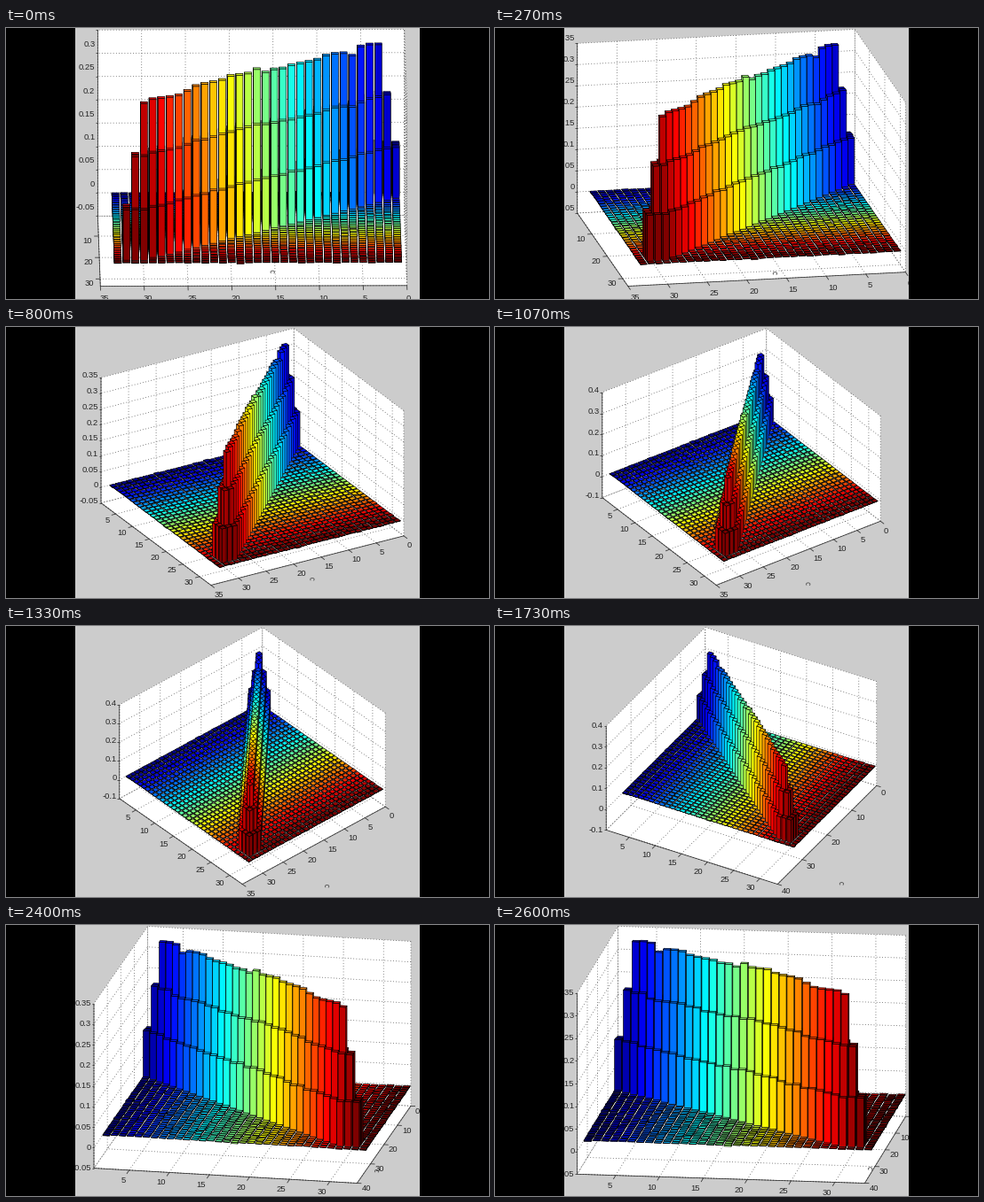
A matplotlib script that plays this animation: 544 by 306 pixels, repeating every 2.67 s.

```python
import numpy as np
import matplotlib.pyplot as plt
from matplotlib.animation import FuncAnimation
from matplotlib.collections import LineCollection, PolyCollection
from matplotlib.patches import Rectangle

W, H, DPI = 544, 306, 100
LOOP, SLOT, STEPS = 2670, 30, 40    # ms, ms, view changes per loop
PX = 72 / DPI                       # points per pixel

N, HALF = 33, 0.4                   # bars per side, half a bar's width
X0, X1 = 1 - HALF, N + HALF
DEPTH, TALL = 0.975, 0.626          # box proportions relative to its width
MID_X, TOP, SPAN = 277, 1, 290      # the projected box always fills this height

# The drag of the view: step, turn and elevation in degrees
KEYS = np.array([0, 7, 12, 20, 26, 32, 39])
TURN = np.array([0.5, 18.1, 30.3, 41.4, 60.6, 73.4, 82.1])
ELEV = np.array([13.6, 18.2, 26.0, 38.0, 34.2, 22.1, 13.1])

# Height of the ridge along the diagonal, in thousandths
CREST = [331, 333, 336, 320, 328, 333, 334, 329, 330, 330, 331, 330, 331, 330,
         340, 339, 338, 341, 338, 335, 337, 336, 331, 328, 329, 332, 331, 328]


def glide(step, values):
    """Smooth cubic through the key values."""
    slopes = np.gradient(values, KEYS)
    i = min(np.searchsorted(KEYS, step, "right") - 1, len(KEYS) - 2)
    span = KEYS[i + 1] - KEYS[i]
    t = (step - KEYS[i]) / span
    return ((2 * t**3 - 3 * t**2 + 1) * values[i]
            + (t**3 - 2 * t**2 + t) * span * slopes[i]
            + (3 * t**2 - 2 * t**3) * values[i + 1]
            + (t**3 - t**2) * span * slopes[i + 1])


def rainbow(t):
    """Dark blue through cyan and yellow to dark red."""
    centers = np.array([3, 2, 1])
    return np.clip(1.5 - np.abs(4 * np.asarray(t)[:, None] - centers), 0, 1)


def bar_heights():
    """Overlap of three-wide windows sliding down the diagonal."""
    i, j = np.mgrid[1:N + 1, 1:N + 1]
    low, high = np.minimum(i, j), np.maximum(i, j)
    count = np.maximum(0, np.minimum(30, low) - np.maximum(1, high - 2) + 1)
    crest = np.pad(np.array(CREST) / 1000, (2, 3), mode="edge")
    noise = np.random.default_rng(4).normal(0, 0.0013, (N, N))
    return count / 3 * (crest[:, None] + crest) / 2 + noise


def bar_faces():
    """Top and the two near sides of each bar, ordered from far to near."""
    z = bar_heights()
    i, j = np.mgrid[1:N + 1, 1:N + 1]
    xa, xb, ya, yb = i - HALF, i + HALF, j - HALF, j + HALF
    lo, hi = np.minimum(z, 0), np.maximum(z, 0)
    faces = [
        [(xb, ya, lo), (xb, yb, lo), (xb, yb, hi), (xb, ya, hi)],
        [(xa, yb, lo), (xb, yb, lo), (xb, yb, hi), (xa, yb, hi)],
        [(xa, ya, hi), (xb, ya, hi), (xb, yb, hi), (xa, yb, hi)],
    ]
    return np.moveaxis(np.array(faces), (3, 4), (0, 1)).reshape(-1, 4, 3)


class View:
    """Orthographic box with its axis limits and tick steps."""

    def __init__(self, step):
        turn = np.radians(glide(step, TURN))
        elev = np.radians(glide(step, ELEV))
        c, s, k = np.cos(turn), np.sin(turn), np.sin(elev)
        size = SPAN / (TALL * np.cos(elev) + k * (DEPTH * c + s))
        self.x = size * DEPTH * np.array([s, c * k])
        self.y = size * np.array([-c, s * k])
        self.rise = size * TALL * np.cos(elev)
        left = MID_X - (self.x[0] - self.y[0]) / 2
        self.origin = np.array([left - self.y[0], TOP + self.rise])
        self.cursor = (299 + 1.5 * np.degrees(turn), 265 + 0.75 * np.degrees(elev))

        wide_x = np.hypot(*self.x) > 140
        wide_y = np.hypot(*self.y) > 170
        self.x_ticks = np.arange(5, 31, 5) if wide_x else np.arange(10, 31, 10)
        self.y_max = 35 if wide_y else 40
        self.y_ticks = np.arange(0, self.y_max + 1, 5 if wide_y else 10)
        if self.rise < 128:
            self.z_min, self.z_max, z_step = -0.1, 0.4, 0.1
        else:
            self.z_min, self.z_max, z_step = -0.05, 0.35, 0.05
        parts = round((self.z_max - self.z_min) / z_step)
        # adding zero turns -0 into 0
        self.z_ticks = np.linspace(self.z_min, self.z_max, parts + 1).round(2) + 0.0

    def __call__(self, points):
        p = np.asarray(points, float)
        u = (p[..., 0:1] - X0) / (X1 - X0)
        v = p[..., 1:2] / self.y_max
        w = (p[..., 2:3] - self.z_min) / (self.z_max - self.z_min)
        return self.origin + u * self.x + v * self.y - w * np.array([0, self.rise])


fig = plt.figure(figsize=(W / DPI, H / DPI), dpi=DPI, facecolor="0.8")
ax = fig.add_axes([0, 0, 1, 1])
ax.set_xlim(-0.5, W - 0.5)
ax.set_ylim(H - 0.5, -0.5)
ax.axis("off")

FACES = bar_faces()
COLORS = np.repeat(rainbow((np.arange(N) + 0.5) / (N - 1.5)).clip(0, 1), N * 3, axis=0)
COLORS[-N * 3:] = (0.5, 0, 0)

walls = ax.add_collection(PolyCollection([], facecolors="white", edgecolors="none", zorder=1))
grid = ax.add_collection(LineCollection([], colors="0.3", linewidths=0.8 * PX,
                                        linestyles=(0, (1, 3)), zorder=2))
frame_lines = ax.add_collection(LineCollection([], colors="0.2", linewidths=0.8 * PX, zorder=3))
bars = ax.add_collection(PolyCollection([], facecolors=COLORS, edgecolors="black",
                                        linewidths=0.65 * PX, joinstyle="round", zorder=4))
labels = [ax.text(0, 0, "", family="Liberation Sans", fontsize=9.5 * PX, color="0.15",
                  va="center", zorder=5) for _ in range(26)]
hand, = ax.plot([], [], color="0.35", lw=0.9 * PX, zorder=6)
for left, width in ((-1, 79), (466, 80)):
    ax.add_patch(Rectangle((left - 0.5, -1), width, H + 2, color="black", lw=0, zorder=9))


def unit(v):
    return v / np.hypot(*v)


def grid_lines(view):
    ym, za, zb = view.y_max, view.z_min, view.z_max
    lines = []
    for x in (X0, *view.x_ticks, X1):
        lines.append([(x, ym, za), (x, 0, za), (x, 0, zb)])
    for y in (*view.y_ticks, ym):
        lines.append([(X1, y, za), (X0, y, za), (X0, y, zb)])
    for z in view.z_ticks:
        lines.append([(X1, 0, z), (X0, 0, z), (X0, ym, z)])
    return view(lines)


def ticks_and_labels(view):
    """Tick segments and (position, text, alignment) for the three axes."""
    ux, uy = unit(view.x), unit(view.y)
    lift = -10 * ux[1] ** 3
    marks, texts = [], []

    def add(points, values, tick, offset, align, style):
        for p, value in zip(view(points), values):
            marks.append([p, p + tick])
            texts.append((p + offset, style(value), align))

    ym, za = view.y_max, view.z_min
    add([(x, ym, za) for x in view.x_ticks], view.x_ticks, 5 * uy,
        uy * (7, 8) + (0, 5), "right", str)
    add([(X1, y, za) for y in view.y_ticks], view.y_ticks, 5 * ux,
        ux * (6, 9) + (-1, 5.5), "left", str)
    add([(X0, ym, z) for z in view.z_ticks], view.z_ticks, np.array([-2.5, 0]),
        np.array([-3, lift]), "right", lambda z: f"{z:g}")
    return marks, texts


def draw(slot):
    # each slot shows the view reached by its end
    view = View(int((slot + 0.95) * SLOT * STEPS / LOOP))
    ym, za, zb = view.y_max, view.z_min, view.z_max
    walls.set_verts(view([
        [(X0, 0, za), (X1, 0, za), (X1, ym, za), (X0, ym, za)],
        [(X0, 0, za), (X1, 0, za), (X1, 0, zb), (X0, 0, zb)],
        [(X0, 0, za), (X0, ym, za), (X0, ym, zb), (X0, 0, zb)],
    ]))
    grid.set_segments(grid_lines(view))
    bars.set_verts(view(FACES))

    marks, texts = ticks_and_labels(view)
    axes = view([(X0, ym, zb), (X0, ym, za), (X1, ym, za), (X1, 0, za)])
    frame_lines.set_segments([axes, *marks])
    for label in labels:
        label.set_text("")
    for label, (pos, text, align) in zip(labels, texts):
        label.set_position(pos)
        label.set_text(text)
        label.set_ha(align)

    # small open loop of the rotate cursor
    a = np.radians(np.linspace(150, 400, 12))
    cx, cy = view.cursor
    hand.set_data(cx + 2.2 * np.cos(a), cy + 1.6 * np.sin(a))
    return [walls, grid, bars, frame_lines, hand, *labels]


anim = FuncAnimation(fig, draw, frames=LOOP // SLOT, interval=SLOT,
                     init_func=lambda: draw(0), repeat=True, repeat_delay=0, blit=False)
plt.show()
```
